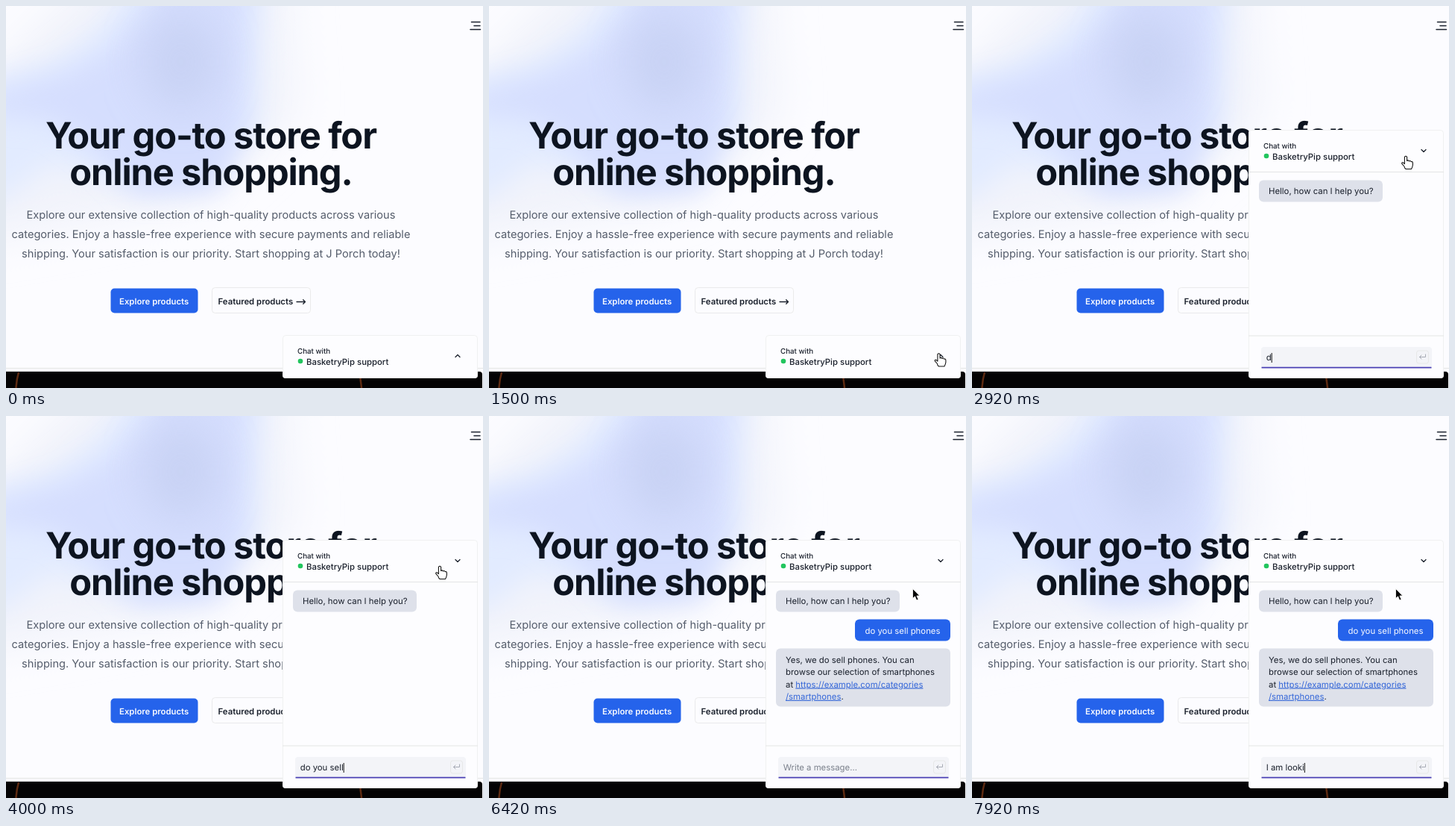
These frames come from a looping animation (640 by 512 pixels, 8000 ms). An HTML page:

```html
<!DOCTYPE html>
<html lang="en">
<head>
<meta charset="utf-8">
<title>Store chat</title>
<style>
  html, body { margin: 0; width: 100%; height: 100%; overflow: hidden; background: #fcfcff; }
  svg { display: block; width: 100%; height: 100%; }
  text { font: 400 11.375px Inter, sans-serif; font-optical-sizing: none; text-rendering: geometricPrecision; white-space: pre; fill: #1a202c; }
  .head text { font-weight: 700; font-size: 48.75px; letter-spacing: -.023em; text-anchor: middle; fill: #0d1420; }
  .lead text { font-size: 14.625px; text-anchor: middle; fill: #555d6b; }
  .btn { font-weight: 600; }
  .mid { font-weight: 500; }
  .link { fill: #3567d8; text-decoration: underline; }
  .line { fill: none; stroke: #e4e5e4; }
  .icon { fill: none; stroke-linecap: round; stroke-linejoin: round; }
</style>
</head>
<body>
<svg viewBox="0 0 640 512">
  <defs>
    <filter id="soft" x="-50%" y="-50%" width="200%" height="200%"><feGaussianBlur stdDeviation="18"/></filter>
    <filter id="wide" x="-50%" y="-50%" width="200%" height="200%"><feGaussianBlur stdDeviation="28"/></filter>
    <clipPath id="clip"><rect id="clipBox" x="371" width="262" rx="4"/></clipPath>
  </defs>

  <rect width="640" height="512" fill="#fcfcff"/>
  <path filter="url(#wide)" fill="#f1f3fb" d="M130-60H375L390 150 260 265 60 300-60 320V130Z"/>
  <path filter="url(#soft)" fill="#e2ebff" d="M165-40 150 0 110 42 55 76-40 100V270L10 250 60 210 180 245 275 235 338 160 345-40Z"/>
  <path filter="url(#soft)" fill="#d5defe" d="M205-40 188 5 145 55 80 90-40 125V142L60 152 120 195 175 250 285 245 318 165 322-40Z"/>
  <ellipse filter="url(#wide)" cx="235" cy="75" rx="52" ry="66" fill="#c3cdf0" opacity=".7"/>

  <path class="icon" stroke="#1a202c" stroke-width="1.5" d="M624.5 21.5H636M628 26.5H636M623 31.5H636.5"/>

  <g class="head">
    <text x="275" y="191">Your go-to store for</text>
    <text x="275" y="240">online shopping.</text>
  </g>
  <g class="lead">
    <text x="275" y="285.3">Explore our extensive collection of high-quality products across various</text>
    <text x="275" y="311.3">categories. Enjoy a hassle-free experience with secure payments and reliable</text>
    <text x="275" y="337.3">shipping. Your satisfaction is our priority. Start shopping at J Porch today!</text>
  </g>
  <rect x="140.5" y="378.5" width="117" height="33" rx="5" fill="#2563eb"/>
  <text class="btn" x="152" y="400" style="fill:#f8faff">Explore products</text>
  <rect class="line" x="276.5" y="377.5" width="132" height="34" rx="4" stroke-opacity=".75"/>
  <text class="btn" x="284.5" y="400">Featured products</text>
  <path class="icon" stroke="#1a202c" stroke-width="1.3" d="M390 396.5H401.5M398.7 393.7 401.5 396.5 398.7 399.3"/>

  <path class="line" d="M0 485.5H640"/>
  <path fill="#040304" d="M0 490H635Q639 490 639 494V512H0Z"/>
  <g fill="none" stroke="#5e2b12" stroke-width="2.5">
    <path d="M17 491Q14 501 13.5 512"/>
    <path d="M474 491Q476 501 477 512"/>
  </g>

  <g clip-path="url(#clip)">
    <g id="chat">
      <rect width="262" height="334" fill="#fdfdff"/>
      <text class="mid" x="20" y="24.5" style="font-size:9.75px">Chat with</text>
      <circle cx="24" cy="35" r="3.3" fill="#22c55e"/>
      <text class="mid" x="32" y="39.6">BasketryPip support</text>
      <path id="chevron" class="icon" stroke="#1a202c" stroke-width="1.3"/>
      <g id="panel">
        <path class="line" d="M0 56.5H262M0 276H262"/>
        <rect x="14" y="67.5" width="166" height="29" rx="6" fill="#dee1ea"/>
        <text x="27" y="86">Hello, how can I help you?</text>
        <g id="asked">
          <rect x="120" y="106.5" width="128" height="29" rx="6" fill="#2563eb"/>
          <text x="133.5" y="125.6" style="fill:#f8faff">do you sell phones</text>
        </g>
        <g id="answer">
          <rect id="bubble" x="14" y="145.5" rx="6" fill="#dee1ea"/>
          <g id="reply"></g>
        </g>
        <rect id="field" x="17" y="291" width="229" height="28" rx="4"/>
        <path id="underline" d="M17.5 318.6H245.5"/>
        <text id="input" x="23.7" y="309.2"></text>
        <rect id="caret" y="299" width="1" height="13" fill="#111"/>
        <rect class="line" x="225.5" y="296" width="16" height="17" rx="3" fill="#fafafd" stroke-opacity=".8"/>
        <path id="enter" class="icon" stroke="#a6aab4" d="M237.5 301V304.5H229.5M232 302 229.5 304.5 232 307"/>
        <path id="spinner" class="icon" stroke="#a6aab4" d="M4 0A4 4 0 1 1 1.2-3.8"/>
      </g>
    </g>
  </g>
  <rect id="frame" class="line" x="371.5" width="261" rx="4" stroke-opacity=".5"/>

  <g id="pointer">
    <path id="arrow" fill="#050505" stroke="#fff" stroke-width=".8" d="M0 0V13L3 10.3 5.2 15.4 7.6 14.4 5.4 9.5H9.3Z"/>
    <path id="hand" fill="#fff" stroke="#111" stroke-width="1.1" stroke-linejoin="round"
      d="M-1.6 1.4Q0-.8 1.6 1.4V6.5Q3.2 5 4.5 7 6 5.8 7.2 7.7 9.2 7 9.4 9.5V12Q9 15 7.5 17.5H0Q-2 16-2 14L-5.2 10.3Q-5.6 8.3-3.6 8.8L-1.6 10.6Z"/>
  </g>
</svg>

<script>
const LOOP = 8000, STEP = 1000 / 12, KEY = 105;
const CLICK = 1860, TYPE = 2870, SEND = 4950, REPLY = 5400, DONE = 5850, TYPE2 = 6940;
const BOTTOM = 499, CLOSED = 58, GROWTH = 275;
const QUESTION = 'do you sell phones', NEXT = 'I am looking for';
// Text between bars is a link.
const LINES = ['Yes, we do sell phones. You can', 'browse our selection of smartphones',
  'at |https://example.com/categories', '|/smartphones|.'];
const TOTAL = LINES.join('').replaceAll('|', '').length;
// Pointer stops: time, x, y
const PATH = [[560, 521, 520], [830, 548.5, 443], [1500, 603.5, 465.5], [2050, 603.5, 465.5],
  [2700, 582, 201], [4700, 582, 201], [5150, 583, 188.5], [5400, 583, 188.5], [5900, 568.5, 231.5]];

const $ = id => document.getElementById(id);
const clamp = (v, lo = 0, hi = 1) => Math.min(hi, Math.max(lo, v));
const set = (id, attrs) => { for (const k in attrs) $(id).setAttribute(k, attrs[k]); };
const show = (id, on) => set(id, { display: on ? 'inline' : 'none' });
const keys = (t, start) => Math.max(0, Math.floor((t - start) / KEY) + 1);

function pointerAt(t) {
  const i = PATH.findIndex(p => p[0] > t);
  if (i < 0) return PATH.at(-1).slice(1);
  if (!i) return PATH[0].slice(1);
  const [a, b] = [PATH[i - 1], PATH[i]];
  const p = (t - a[0]) / (b[0] - a[0]), e = p * p * (3 - 2 * p);
  return [a[1] + (b[1] - a[1]) * e, a[2] + (b[2] - a[2]) * e];
}

function drawPointer(t, top) {
  const [x, y] = pointerAt(t);
  const hand = x > 375 && x < 629 && y > top + 4 && y < top + 56;
  set('pointer', { transform: `translate(${x} ${y})` });
  show('pointer', t > PATH[0][0]);
  show('hand', hand);
  show('arrow', !hand);
}

function drawReply(t) {
  show('answer', t >= REPLY);
  let left = Math.ceil(TOTAL * clamp((t - REPLY) / (DONE - REPLY))), rows = 0;
  $('reply').innerHTML = LINES.map((line, i) => {
    if (left > 0) rows = i + 1;
    const spans = line.split('|').map((part, j) => {
      const shown = part.slice(0, Math.max(0, left));
      left -= part.length;
      return j % 2 ? `<tspan class="link">${shown}</tspan>` : shown;
    });
    return `<text x="27" y="${165 + i * 16.25}">${spans.join('')}</text>`;
  }).join('');
  const first = $('reply').firstChild.getComputedTextLength();
  set('bubble', {
    width: rows > 1 ? 234 : Math.min(234, first + 26),
    height: 29 + 16.3 * Math.max(0, rows - 1)
  });
}

function drawInput(t) {
  const busy = t >= SEND && t < DONE;
  const typed = t < DONE ? QUESTION.slice(0, keys(t, TYPE)) : NEXT.slice(0, keys(t, TYPE2));
  $('input').textContent = typed || 'Write a message...';
  $('input').style.fill = typed && !busy ? '#1a202c' : '#7b808c';
  set('field', { fill: busy ? '#f9f9fc' : '#f3f4f8' });
  set('underline', { stroke: busy ? '#dfe0e2' : '#4a40b4', 'stroke-width': busy ? 1 : 1.7 });

  const start = t < DONE ? TYPE : TYPE2, full = t < DONE ? QUESTION : NEXT;
  const last = typed ? start + (Math.min(keys(t, start), full.length) - 1) * KEY
    : t < DONE ? CLICK : DONE;
  show('caret', !busy && Math.floor((t - last) / 500) % 2 === 0);
  set('caret', { x: 23.7 + (typed ? $('input').getComputedTextLength() : 0) });

  show('enter', !busy);
  show('spinner', busy);
  set('spinner', { transform: `translate(233.5 304.5) rotate(${t * .36})` });
}

function draw(t) {
  const p = clamp((t - CLICK) / 200), open = 1 - (1 - p) ** 2;
  const height = CLOSED + GROWTH * open, top = BOTTOM - height;
  set('chat', { transform: `translate(371 ${top})` });
  set('clipBox', { y: top, height });
  set('frame', { y: top + .5, height: height - 1 });
  set('chevron', { d: p ? 'M232 26.5 235 29.5 238 26.5' : 'M232 29.5 235 26.5 238 29.5' });
  show('panel', p > 0);
  show('asked', t >= SEND);
  drawReply(t);
  drawInput(t);
  drawPointer(t, top);
}

const begin = performance.now();
function tick() {
  const t = (performance.now() - begin) % LOOP;
  draw(Math.floor((t + 4) / STEP) % 96 * STEP);
  requestAnimationFrame(tick);
}
tick();
</script>
</body>
</html>
```
